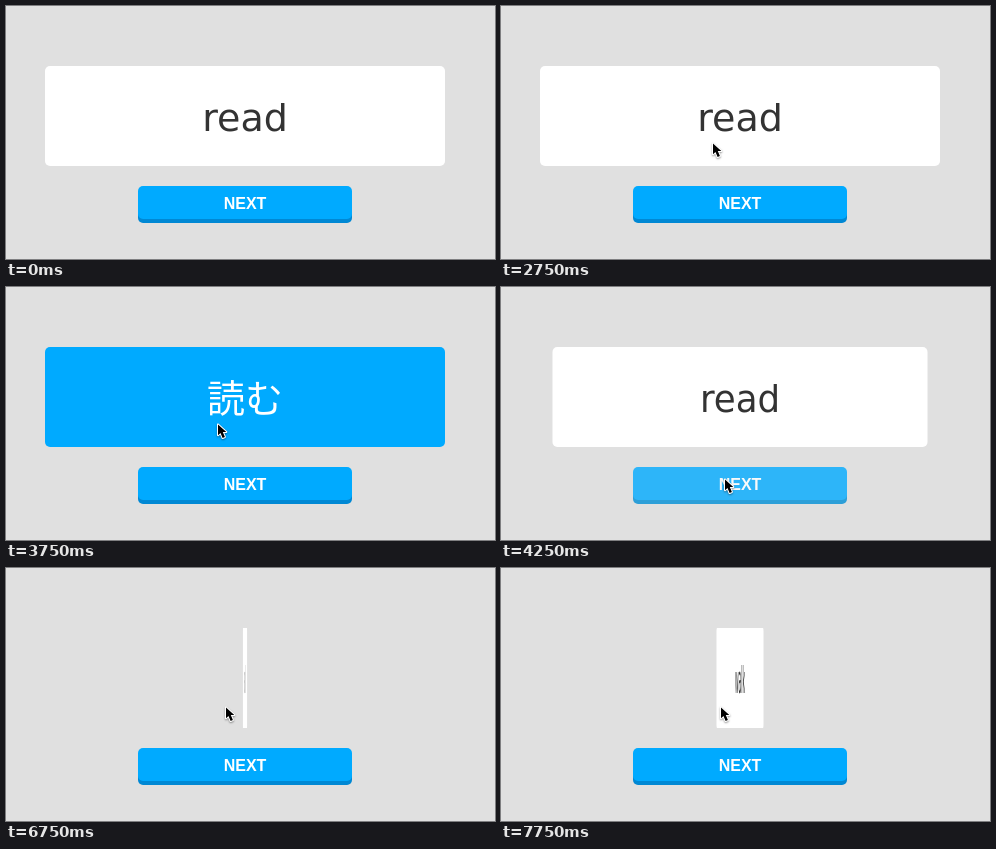
Recreate the animation shown at these times as an HTML page with a canvas. Size 489 by 253 pixels, loop 8 s.

```html
<!DOCTYPE html>
<html lang="en">
<head>
<meta charset="utf-8">
<title>Flash card</title>
<style>
  html, body { margin: 0; width: 100%; height: 100%; overflow: hidden; background: #e0e0e0; }
  canvas { display: block; width: 489px; height: 253px; }
</style>
</head>
<body>
<canvas id="stage"></canvas>
<script>
const W = 489, H = 253, LOOP = 8000, STEP = 250, FLIP = 600;
const BLUE = '#00aaff';
const CARD = { x: 39, y: 60, w: 400, h: 100 };
const BUTTON = { x: 132, y: 180, w: 214, h: 33 };

const words = [
  { from: 0, front: 'read', back: '読む' },
  { from: 4600, front: 'walk', back: '歩く' }
];
// Each click turns the card over.
const clicks = [2880, 3888.5, 6575, 7562.5];
// Pointer path: time, x, y
const path = [
  [750, 103, 168], [1750, 190, 179], [2000, 206, 184], [2250, 211, 150],
  [2500, 211, 135], [3750, 211, 135], [4000, 212, 140], [4250, 223, 190],
  [4500, 223, 194], [5750, 223, 194], [6000, 220, 147], [6250, 219, 137],
  [8000, 219, 137]
];

const canvas = document.getElementById('stage');
const ctx = canvas.getContext('2d');
const dpr = window.devicePixelRatio || 1;
canvas.width = W * dpr;
canvas.height = H * dpr;

// Same curve as the CSS "ease" keyword.
function ease(x) {
  if (x <= 0) return 0;
  if (x >= 1) return 1;
  const bez = (a, b, s) => 3 * (1 - s) ** 2 * s * a + 3 * (1 - s) * s * s * b + s ** 3;
  let lo = 0, hi = 1;
  for (let i = 0; i < 30; i++) {
    const mid = (lo + hi) / 2;
    if (bez(0.25, 0.25, mid) < x) lo = mid; else hi = mid;
  }
  return bez(0.1, 1, lo);
}

function pointerAt(t) {
  if (t < path[0][0]) return null;
  const i = path.findIndex(p => p[0] > t);
  const a = path[i - 1], b = path[i];
  const k = (t - a[0]) / (b[0] - a[0]);
  return { x: a[1] + (b[1] - a[1]) * k, y: a[2] + (b[2] - a[2]) * k };
}

function box(x, y, w, h, r, color) {
  ctx.fillStyle = color;
  ctx.beginPath();
  ctx.roundRect(x, y, w, h, r);
  ctx.fill();
}

function label(text, x, y, font, color) {
  ctx.font = font;
  ctx.textAlign = 'center';
  ctx.fillStyle = color;
  ctx.fillText(text, x, y);
}

function drawCard(t) {
  const turn = clicks.reduce((sum, c) => sum + ease((t - c) / FLIP), 0);
  const cos = Math.cos(turn * Math.PI);
  const word = words.filter(w => t >= w.from).pop();
  const { x, y, w, h } = CARD;
  ctx.save();
  ctx.translate(x + w / 2, 0);
  ctx.scale(Math.abs(cos), 1);
  if (cos > 0) {
    box(-w / 2, y, w, h, 5, '#fff');
    label(word.front, 0, 125, '38px "DejaVu Sans", sans-serif', '#333');
  } else {
    box(-w / 2, y, w, h, 5, BLUE);
    label(word.back, 0, 125, '38px "Noto Sans CJK JP", "Noto Sans CJK", sans-serif', '#fff');
  }
  ctx.restore();
}

function drawButton(hover) {
  const { x, y, w, h } = BUTTON;
  box(x, y + 4, w, h, 5, hover ? '#2d9fd8' : '#0088d4');
  box(x, y, w, h, 5, hover ? '#2db5f9' : BLUE);
  label('NEXT', x + w / 2, 203, 'bold 16px "Liberation Sans", Arial, sans-serif', hover ? '#f9f9f9' : '#fff');
}

function drawPointer({ x, y }) {
  const arrow = new Path2D('M1 2.4V13.2L3.5 10.9 5.6 16 7.9 15 5.8 10H9.3Z');
  ctx.save();
  ctx.translate(x, y);
  ctx.lineJoin = 'round';
  ctx.lineWidth = 2;
  ctx.strokeStyle = '#fff';
  ctx.shadowColor = 'rgba(0,0,0,.4)';
  ctx.shadowBlur = 2 * dpr;
  ctx.shadowOffsetY = dpr;
  ctx.stroke(arrow);
  ctx.shadowColor = 'transparent';
  ctx.fillStyle = '#000';
  ctx.fill(arrow);
  ctx.restore();
}

function draw(t) {
  const p = pointerAt(t);
  const { x, y, w, h } = BUTTON;
  const hover = p && p.x >= x && p.x < x + w && p.y >= y && p.y < y + h;
  ctx.setTransform(dpr, 0, 0, dpr, 0, 0);
  ctx.fillStyle = '#e0e0e0';
  ctx.fillRect(0, 0, W, H);
  drawCard(t);
  drawButton(hover);
  if (p) drawPointer(p);
}

const start = performance.now();
function tick() {
  const t = (performance.now() - start) % LOOP;
  draw(Math.floor(t / STEP) * STEP);
  requestAnimationFrame(tick);
}
tick();
</script>
</body>
</html>
```
